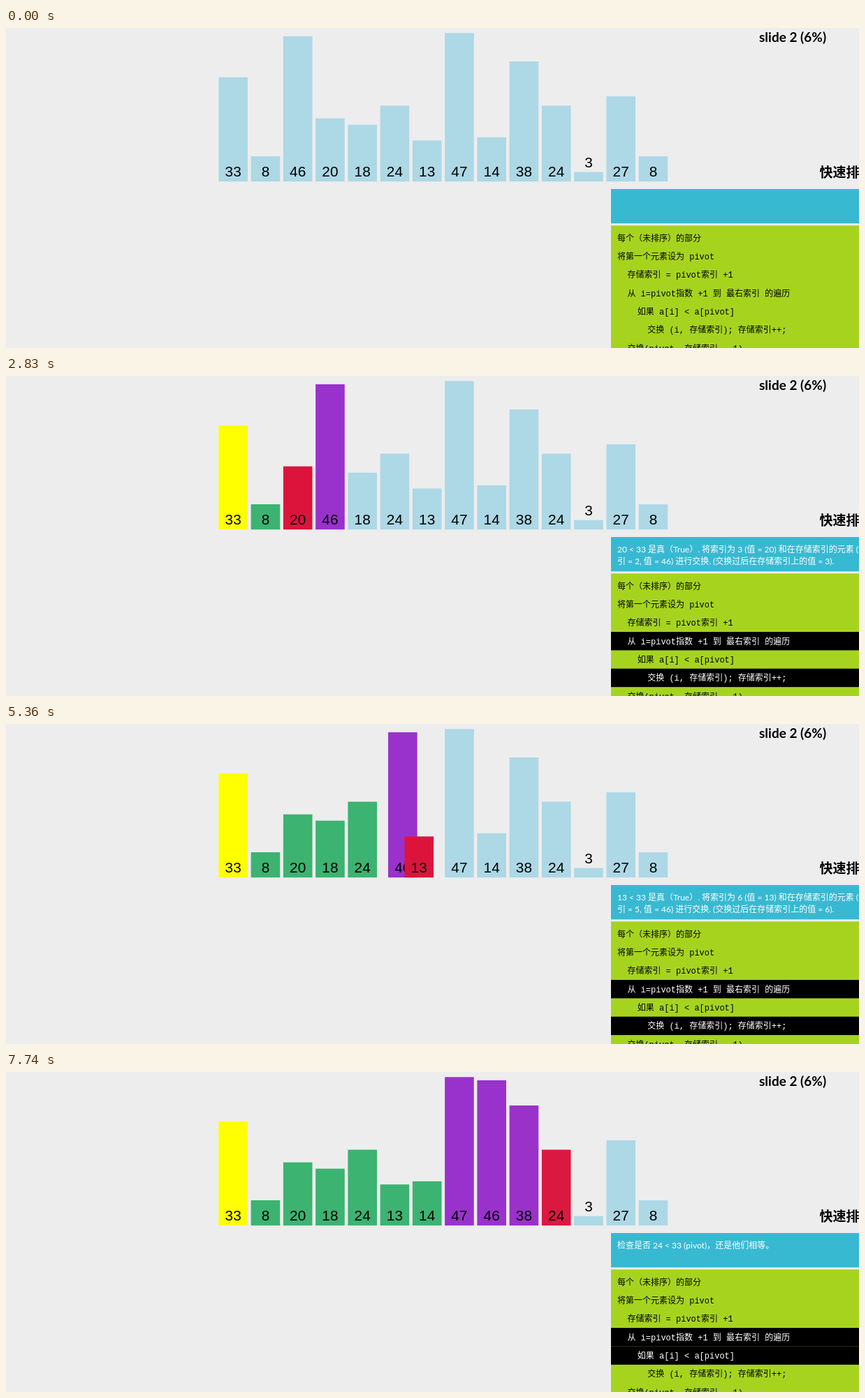
Recreate the animation shown at these times as an HTML page. Size 1221 by 459 pixels, loop 8 s.

```html
<!DOCTYPE html>
<html lang="zh-CN">
<head>
<meta charset="utf-8">
<title>快速排序</title>
<style>
  html, body { margin: 0; width: 100%; height: 100%; overflow: hidden; background: #ededed; }
  svg { display: block; width: 1221px; height: 459px; }
  .bar { font: 20.8px "Liberation Sans", Arial, sans-serif; text-anchor: middle; }
  .slide { font: 700 19px Lato, sans-serif; }
  .title { font: 700 19px "Noto Sans CJK SC", "Noto Sans CJK", sans-serif; }
  .status { font: 12px Lato, "Noto Sans CJK SC", "Noto Sans CJK", sans-serif; fill: #fff; }
  .code { font: 12px "Liberation Mono", "Noto Sans CJK SC", "Noto Sans CJK", monospace; }
</style>
</head>
<body>
<svg id="stage" viewBox="0 0 1221 459">
  <text class="slide" x="1078" y="20">slide 2 (6%)</text>
  <text class="title" x="1164.5" y="214">快速排序</text>
  <rect x="866" y="231" width="355" height="49.3" fill="#38b9d2"/>
  <rect x="866" y="283.3" width="355" height="176" fill="#a6d41e"/>
</svg>
<script>
const stage = document.getElementById('stage');
const LOOP = 8000, PERIOD = 453, FIRST = 269, TWEEN = 270;
const PITCH = 46.25, LEFT = 304.4, WIDTH = 41.6, BASE = 220.2, UNIT = 4.53;

const BLUE = [173, 216, 230], YELLOW = [255, 255, 0], RED = [220, 20, 60],
      GREEN = [60, 179, 113], PURPLE = [153, 50, 204];

const values = [33, 8, 46, 20, 18, 24, 13, 47, 14, 38, 24, 3, 27, 8];
const code = [
  [0, '每个（未排序）的部分'],
  [0, '将第一个元素设为 pivot'],
  [1, '存储索引 = pivot索引 +1'],
  [1, '从 i=pivot指数 +1 到 最右索引 的遍历'],
  [2, '如果 a[i] < a[pivot]'],
  [3, '交换 (i, 存储索引); 存储索引++;'],
  [1, '交换(pivot, 存储索引 - 1)']
];

function add(parent, tag, attrs, text) {
  const node = document.createElementNS('http://www.w3.org/2000/svg', tag);
  for (const key in attrs) node.setAttribute(key, attrs[key]);
  if (text !== undefined) node.textContent = text;
  return parent.appendChild(node);
}

// Run the partition once and record every step.
function partition(lastIndex) {
  const steps = [], slots = values.map((_, i) => i);
  const fill = values.map(() => BLUE), pivot = values[0];
  const record = (lines, ...text) =>
    steps.push({ lines, text, fill: fill.slice(), slot: values.map((_, id) => slots.indexOf(id)) });

  record([]);
  fill[0] = YELLOW;
  record([0, 1, 2], `选择 ${pivot} 作为 pivot (存储索引 = 1)。`);

  let store = 1;
  for (let i = 1; i <= lastIndex; i++) {
    const id = slots[i], value = values[id];
    fill[id] = RED;
    record([3, 4], `检查是否 ${value} < ${pivot} (pivot)，还是他们相等。`);
    if (value < pivot) {
      const other = slots[store];
      slots[i] = other;
      slots[store] = id;
      const [head, tail] = value < 10 ? ['索引', ''] : ['索', '引 '];
      record([3, 5],
        `${value} < ${pivot} 是真（True）. 将索引为 ${i} (值 = ${value}) 和在存储索引的元素 (${head}`,
        `${tail}= ${store}, 值 = ${values[other]}) 进行交换. (交换过后在存储索引上的值 = ${store + 1}).`);
      store++;
      fill[id] = GREEN;
    } else {
      fill[id] = PURPLE;
    }
  }
  return steps;
}
const steps = partition(10);

const bars = values.map(value => {
  const group = add(stage, 'g', { class: 'bar' }), height = value * UNIT;
  const rect = add(group, 'rect', { y: BASE - height, width: WIDTH, height });
  add(group, 'text', { x: WIDTH / 2, y: height < 20 ? BASE - height - 7 : BASE - 7 }, value);
  return { group, rect };
});

const status = [253, 270].map(y => add(stage, 'text', { class: 'status', x: 875, y }));

const rows = code.map(([indent, text], i) => {
  const top = 288 + 26.35 * i;
  const band = add(stage, 'rect', { x: 866, y: top, width: 355, height: 26.4 });
  const label = add(stage, 'text', { class: 'code', x: 875 + 14.4 * indent, y: top + 17.5 }, text);
  return { band, label };
});

// The picture holds between ticks of 150 ms, a few of them 140 ms.
const SHORT = [6, 14, 22, 28, 45, 49], LAST = 52;
const tickTime = n => 150 * n - 10 * SHORT.filter(k => k <= n).length;

const ease = p => p < 0.5 ? 4 * p ** 3 : 1 - 4 * (1 - p) ** 3;
const mix = (a, b, p) => a + (b - a) * p;

function draw(n) {
  const time = 148.85 * n;
  const k = Math.min(steps.length - 1, Math.max(0, Math.floor((time - FIRST) / PERIOD) + 1));
  const step = steps[k], prev = steps[Math.max(0, k - 1)];
  const start = FIRST + PERIOD * (k - 1);
  const p = ease(Math.min(1, (time - start) / TWEEN));

  bars.forEach(({ group, rect }, id) => {
    const x = LEFT + PITCH * mix(prev.slot[id], step.slot[id], p);
    const rgb = step.fill[id].map((c, j) => Math.round(mix(prev.fill[id][j], c, p)));
    group.setAttribute('transform', `translate(${x} 0)`);
    rect.setAttribute('fill', `rgb(${rgb})`);
  });
  status.forEach((line, i) => { line.textContent = step.text[i] || ''; });
  rows.forEach(({ band, label }, i) => {
    const on = step.lines.includes(i);
    band.setAttribute('fill', on ? '#000' : 'none');
    label.setAttribute('fill', on ? '#fff' : '#000');
  });
}

let shown = -1;
const origin = performance.now();
function frame() {
  const t = (performance.now() - origin) % LOOP;
  let n = 0;
  while (n < LAST && tickTime(n + 1) <= t) n++;
  if (n !== shown) draw(shown = n);
  requestAnimationFrame(frame);
}
frame();
</script>
</body>
</html>
```
